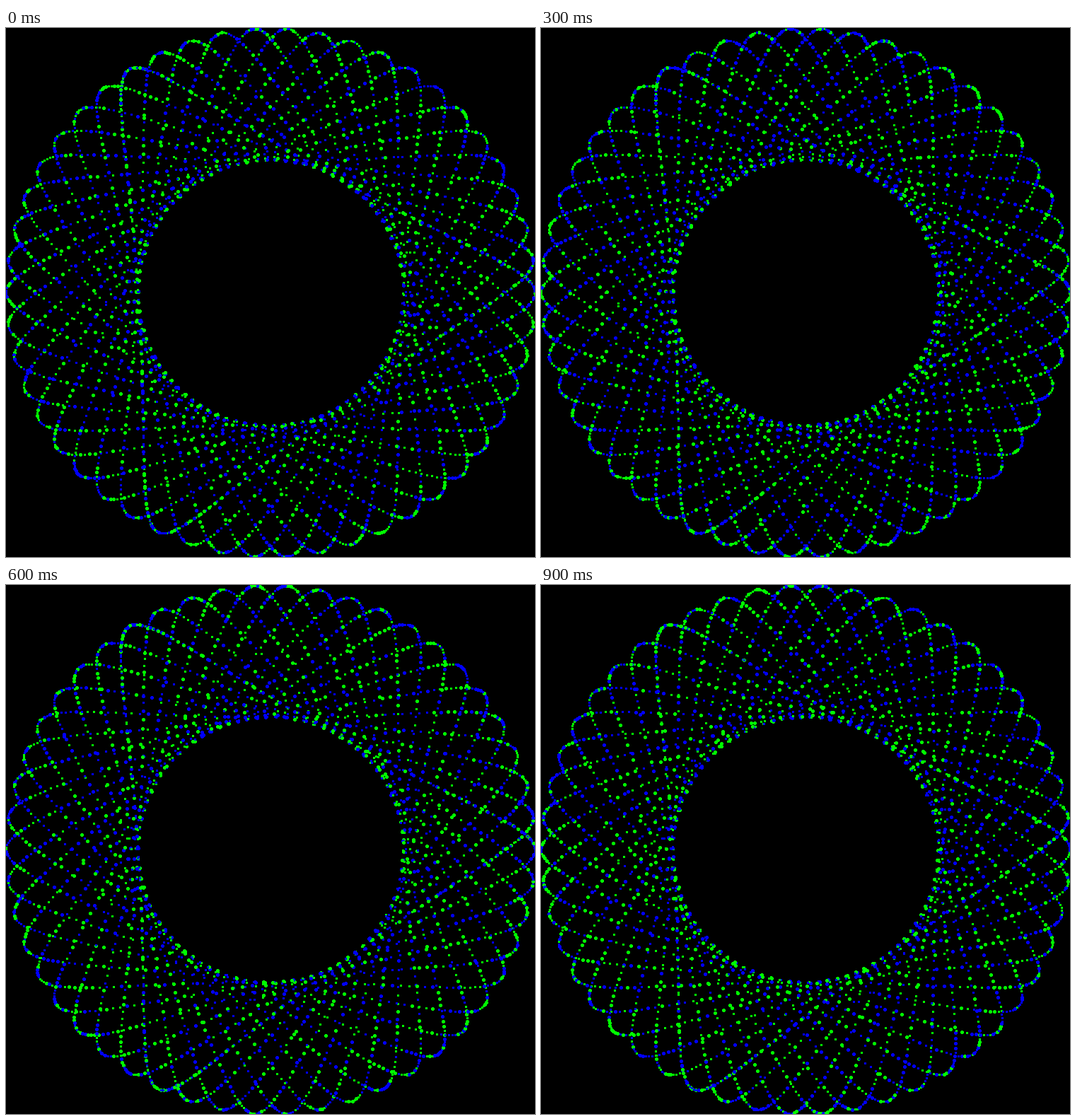
These frames come from a looping animation (748x748 px, 1000 ms). An HTML page with a canvas:

```html
<!DOCTYPE html>
<html lang="en">
<head>
<meta charset="utf-8">
<title>Dotted spirograph</title>
<style>
  html, body { margin: 0; width: 100%; height: 100%; overflow: hidden; background: #000; }
  canvas { display: block; }
</style>
</head>
<body>
<canvas id="stage" width="748" height="748"></canvas>
<script>
const ctx = document.getElementById('stage').getContext('2d');
const CENTER = 374;
const ARM = 280.5;           // radius of the rolling centre
const PEN = 93.5;            // distance of the pen from it
const RATIO = 33 / 17;       // 50 petals in 17 turns
const TURNS = 18;            // the last turn retraces the first
const COUNT = 3560;
const STEPS = 10, STEP_MS = 100;
const COLORS = ['#0000ff', '#00ff00'];

const dots = Array.from({ length: COUNT }, (_, i) => {
  const t = i / COUNT * TURNS * 2 * Math.PI;
  return [
    Math.round(CENTER + ARM * Math.cos(t) + PEN * Math.cos(RATIO * t)),
    Math.round(CENTER - ARM * Math.sin(t) + PEN * Math.sin(RATIO * t))
  ];
});

function seeded(seed) {
  return () => {
    seed = (seed + 0x6D2B79F5) | 0;
    let n = Math.imul(seed ^ (seed >>> 15), 1 | seed);
    n = (n + Math.imul(n ^ (n >>> 7), 61 | n)) ^ n;
    return ((n ^ (n >>> 14)) >>> 0) / 4294967296;
  };
}

function dot(x, y, big) {
  if (big) {
    ctx.fillRect(x - 1, y - 2, 3, 5);
    ctx.fillRect(x - 2, y - 1, 5, 3);
  } else {
    ctx.fillRect(x - 1, y - 1, 3, 3);
  }
}

function draw(step) {
  const random = seeded(step * 7919 + 17);
  let color = 0;
  ctx.fillStyle = '#000';
  ctx.fillRect(0, 0, 748, 748);
  for (const [x, y] of dots) {
    if (random() < 0.42) color = 1 - color;
    ctx.fillStyle = COLORS[color];
    dot(x, y, random() < 0.45);
  }
}

let shown = -1;
function tick(now) {
  const step = Math.floor(now / STEP_MS) % STEPS;
  if (step !== shown) draw(shown = step);
  requestAnimationFrame(tick);
}
tick(performance.now());
</script>
</body>
</html>
```
